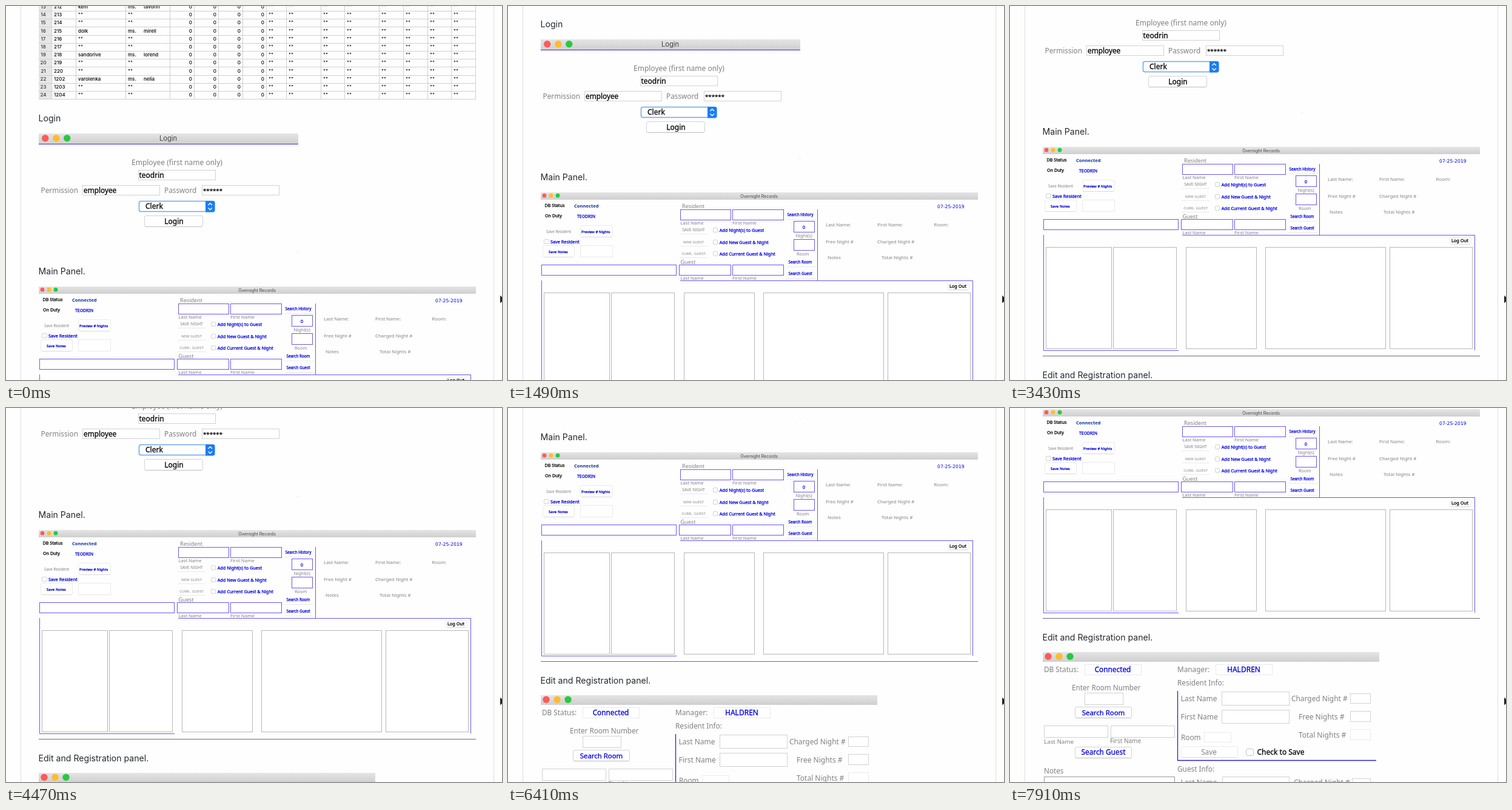
An HTML page that plays this animation: 818x616 px, repeating every 8 s.

```html
<!DOCTYPE html>
<html lang="en">
<head>
<meta charset="utf-8">
<title>Overnight records walkthrough</title>
<style>
  html, body { margin: 0; width: 100%; height: 100%; overflow: hidden; background: #fefefe; }
  svg { display: block; width: 818px; height: 616px; }
  text { font-family: "Noto Sans", "Open Sans", sans-serif; white-space: pre; }
  .page { font-family: Inter, Roboto, sans-serif; }
  .date { font-family: "DejaVu Sans", sans-serif; }
  .cell { font: 500 8px Inter, Roboto, sans-serif; }
</style>
</head>
<body>
<svg viewBox="0 0 818 616">
  <defs>
    <linearGradient id="bar" x2="0" y2="1">
      <stop offset="0" stop-color="#e4e4e4"/>
      <stop offset="1" stop-color="#cfcfcf"/>
    </linearGradient>
  </defs>
  <path d="M24.5 0V616M804.5 0V616" stroke="#dedede"/>
  <g id="doc"></g>
  <path d="M815 476.5V489.5L818 487V479.5Z" fill="#000" stroke="#fff" stroke-width=".4"/>
</svg>
<script>
const doc = document.getElementById("doc");
const GREY = "#808080", BLUE = "#0000e0", VIOLET = "#6c58f0", PALE = "#d2d2d2", FAINT = "#eaeaea";

function add(tag, attrs, content) {
  const node = document.createElementNS("http://www.w3.org/2000/svg", tag);
  for (const key in attrs) node.setAttribute(key, attrs[key]);
  if (content !== undefined) node.textContent = content;
  return doc.appendChild(node);
}
const text = (x, y, string, size, fill = GREY, more = {}) =>
  add("text", { x, y, "font-size": size, fill, ...more }, string);
const centred = (x, y, string, size, fill, more) =>
  text(x, y, string, size, fill, { "text-anchor": "middle", ...more });
// A thin outline gives the medium weight of the form's active labels.
const medium = fill => ({ stroke: fill, "stroke-width": .28 });
const strong = (x, y, string, size, fill = BLUE) => text(x, y, string, size, fill, medium(fill));
const strongCentred = (x, y, string, size, fill = BLUE) => centred(x, y, string, size, fill, medium(fill));
const line = (d, stroke, width = 1) => add("path", { d, stroke, fill: "none", "stroke-width": width });
const box = (x1, y1, x2, y2, stroke = PALE, more = {}) =>
  add("rect", { x: x1 + .5, y: y1 + .5, width: x2 - x1 - 1, height: y2 - y1 - 1, fill: "#fff", stroke, ...more });
const button = (x1, y1, x2, y2, edge = FAINT) => {
  box(x1, y1, x2, y2, edge, { rx: 2.5 });
  line(`M${x1 + 2} ${y2 - .5}H${x2 - 2}`, edge === FAINT ? "#d9d9d9" : "#bdbdbd");
};

function titleBar(x2, y, height, firstX, gap, r) {
  add("rect", { x: 54, y, width: x2 - 54, height, fill: "url(#bar)" });
  ["#fc5b57", "#fdbc2e", "#28c840"].forEach((fill, i) =>
    add("circle", { cx: firstX + i * gap, cy: y + height / 2 - .8, r, fill }));
}
const heading = (y, string) => text(53.5, y, string, 14.1, "#24292e", { class: "page" });

function drawTable() {
  const people = { 13: "kem|tavorin", 16: "dolk|mirell", 19: "sandorive|lorend", 22: "varolenka|nelia" };
  const edges = [75, 115, 197, 270, 310, 350, 390, 429, 462, 519, 558, 615, 655, 695, 734, 774];
  const pitch = 13.2, top = -5.3;
  const cell = (x, y, string, more) => add("text", { x, y, class: "cell", ...more }, string);
  add("rect", { x: 54, y: top, width: 21, height: pitch * 12, fill: "#e6e6e6" });
  for (let row = 13; row <= 24; row++) {
    const edge = top + (row - 13) * pitch, y = edge + 9.3;
    const [last, first] = (people[row] || "").split("|");
    const id = row < 21 ? row + 199 : row === 21 ? 220 : row + 1180;
    line(`M54 ${Math.round(edge + pitch) + .5}H774`, "#d0d0d0");
    centred(61.5, y, row, 8, "#333", { class: "cell" });
    cell(79, y, id);
    cell(119, y, last || '""');
    cell(201, y, first ? "ms." : '""');
    if (first) cell(227, y, first);
    [307, 347, 387, 426].forEach(x => cell(x, y, "0", { "text-anchor": "end" }));
    edges.slice(7, 15).forEach(x => cell(x + 4, y, '""'));
  }
  edges.forEach(x => line(`M${x + .5} 0V154`, "#d0d0d0"));
}

function drawLogin() {
  titleBar(482, 210, 17, 64.7, 18, 5.7);
  centred(267.5, 221.5, "Login", 11.2, "#444", { class: "page" });
  line("M54 227.5H482", "#3a30d8");
  text(207, 261.5, "Employee (first name only)", 12);
  box(218, 270, 346, 287);
  strong(219.5, 283, "teodrin", 12, "#000");
  text(57.5, 308, "Permission", 11.8);
  box(126, 295, 254, 312);
  strong(128, 308, "employee", 11.8, "#000");
  text(261, 308, "Password", 11.8);
  box(323, 295, 451, 312);
  strong(325, 308, "******", 9.7, "#000");
  box(219, 321, 344, 339, "#69a8ea", { rx: 3, "stroke-width": 1.5 });
  add("path", { d: "M329 321H341Q344.5 321 344.5 324V336Q344.5 339.5 341 339.5H329Z", fill: "#1b7df5" });
  line("M333.5 328L336.7 324.8L339.9 328M333.5 332.5L336.7 335.7L339.9 332.5", "#fff", 1.4);
  strong(230, 334, "Clerk", 12, "#000");
  button(228, 345, 325, 364, PALE);
  strongCentred(277, 358.5, "Login", 12, "#000");
  line("M480 406.5H483", "#e4e4e4");
}

function drawMain() {
  titleBar(775, 462, 12, 60, 11, 3.4);
  centred(414, 470.5, "Overnight Records", 7, "#444", { class: "page" });
  strong(60.5, 486.3, "DB Status", 7.2, "#000");
  text(109, 486.8, "Connected", 7.6, "#0a2f9c", { "font-weight": 700 });
  strong(61, 503.3, "On Duty", 7.2, "#000");
  strong(114, 504, "TEODRIN", 6.9);
  button(119, 516, 173, 536);
  text(63, 528.5, "Save Resident", 6.3);
  strong(121, 528.5, "Preview # Nights", 6);
  box(59, 539, 68, 547, PALE, { rx: 1.5 });
  strong(70, 546, "Save Resident", 7.3);
  button(57, 549, 110, 569);
  strong(67, 562, "Save Notes", 6.1);
  box(119, 549, 173, 569, FAINT);

  const field = (x1, y1, x2) => box(x1, y1, x2, y1 + 18, VIOLET);
  field(55, 581, 278);
  text(287, 488, "Resident", 9.1);
  text(284.5, 580, "Guest", 9.1);
  [[284, 490], [282, 581]].forEach(([x, y]) => {
    field(x, y, 368);
    field(370, y, 455);
    text(284.5, y + 24.5, "Last Name", 7.6);
    text(370, y + 24.5, "First Name", 7.8);
  });
  [["SAVE NIGHT", 6.6, "Add Night(s) to Guest", 527],
   ["NEW GUEST", 6, "Add New Guest & Night", 547],
   ["CURR.. GUEST", 6.1, "Add Current Guest & Night", 566]].forEach(([action, size, label, y]) => {
    line(`M283 ${y + 3.5}H329`, FAINT);
    centred(306, y - .7, action, size);
    box(338, y - 7, 346, y + 1, PALE, { rx: 1.5 });
    strong(348.7, y + .3, label, 7.3);
  });

  [["History", 501], ["Room", 579], ["Guest", 598]].forEach(([what, y]) => {
    line(`M459 ${y + 5.5}H507`, FAINT);
    strongCentred(482, y, "Search " + what, 6.3);
  });
  box(471, 509, 506, 528, VIOLET);
  strongCentred(488, 522, "0", 7.5);
  text(474.5, 536.3, "Night(s)", 7.4);
  box(471, 539, 506, 558, VIOLET);
  text(476, 566, "Room", 7.4);
  line("M510.5 490V607", VIOLET);

  text(708, 488, "07-25-2019", 7.7, BLUE, { class: "date" });
  [[524, 518.3, "Last Name:"], [609, 518.3, "First Name:"], [702.5, 518.3, "Room:"],
   [524, 546, "Free Night #"], [609, 546, "Charged Night #"],
   [527, 572.3, "Notes"], [616, 572.3, "Total Nights #"]].forEach(([x, y, label]) => text(x, y, label, 7.9));

  line("M284 607.5H767M766.5 607V797M55.5 607V797.5H278", VIOLET);
  button(725, 611, 761, 623);
  strong(728, 619, "Log Out", 7.4, "#000");
  [[59, 168], [170, 275], [290, 407], [421, 620], [626, 763]].forEach(([x1, x2]) => box(x1, 627, x2, 795, "#b8b8b8"));
  line("M54 806.5H775", "#6c6c80");
}

function drawEdit() {
  titleBar(609, 862, 16, 63, 18, 5.7);
  text(56, 895, "DB Status:", 11.8);
  box(123, 882, 217, 900, FAINT);
  strongCentred(169.5, 895, "Connected", 11.8);
  text(276, 895, "Manager:", 11.8);
  box(339, 882, 433, 900, FAINT);
  strongCentred(385.5, 895, "HALDREN", 12);
  text(276, 916.5, "Resident Info:", 11.8);

  text(102, 925, "Enter Room Number", 11.7);
  box(123, 929, 187, 949);
  button(107, 952, 201, 971, PALE);
  strongCentred(154, 966, "Search Room", 11.4);
  box(56, 983, 162, 1003);
  box(166, 983, 272, 1003);
  text(56, 1012.5, "Last Name", 9.8);
  text(165, 1012, "First Name", 10);
  button(107, 1018, 201, 1037, PALE);
  strongCentred(154, 1031, "Search Guest", 11.8);
  text(56, 1062, "Notes", 11.7);
  box(56, 1067, 272, 1130, "#999");

  line("M276.5 926V1040.5H604", "#2a22c4", 1.3);
  text(281.5, 943, "Last Name", 12);
  box(349, 927, 461, 950);
  text(464, 943, "Charged Night #", 11.9);
  box(561, 930, 595, 947);
  text(281.5, 973, "First Name", 12);
  box(349, 957, 461, 980);
  text(476, 973, "Free Nights #", 12);
  box(561, 959, 595, 977);
  text(282, 1007, "Room", 11.8);
  box(320, 994, 365, 1011, FAINT);
  text(476, 1002.5, "Total Nights #", 12);
  box(561, 989, 595, 1007, FAINT);
  button(282, 1017, 376, 1036);
  centred(328, 1030.5, "Save", 11.8);
  box(389, 1021, 402, 1033, "#c4c4c4", { rx: 2.5 });
  strong(407.5, 1031, "Check to Save", 12, "#000");

  text(276, 1059, "Guest Info:", 11.8);
  text(281.5, 1081, "Last Name", 12);
  box(350, 1067, 461, 1090);
  text(468, 1081, "Charged Night #", 11.9);
  box(564, 1070, 595, 1088);
}

drawTable();
heading(190, "Login");
drawLogin();
heading(442, "Main Panel.");
drawMain();
heading(843, "Edit and Registration panel.");
drawEdit();

// Scroll bursts: start time, then the scroll position after each step.
const LOOP = 8000, STEP = 149.3;
const bursts = [
  [150, 8, 26, 46, 64, 81, 97, 112, 127, 141, 155, 168, 179, 188, 195],
  [2990, 199, 208, 219, 230, 240, 248, 253, 256],
  [4330, 258, 261],
  [4920, 265, 276, 290, 304, 318, 331, 343, 355, 367, 378, 389, 399, 408, 415, 421],
  [7612, 428, 443, 460]
];
const stops = [[0, 0]];
for (const [start, ...positions] of bursts)
  positions.forEach((y, i) => stops.push([Math.floor((start + i * STEP) / 10) * 10, y]));
stops.push([LOOP, 460]);

doc.animate(stops.map(([time, y]) =>
  ({ offset: time / LOOP, transform: `translateY(${-y}px)`, easing: "step-end" })),
  { duration: LOOP, iterations: Infinity });
</script>
</body>
</html>
```
